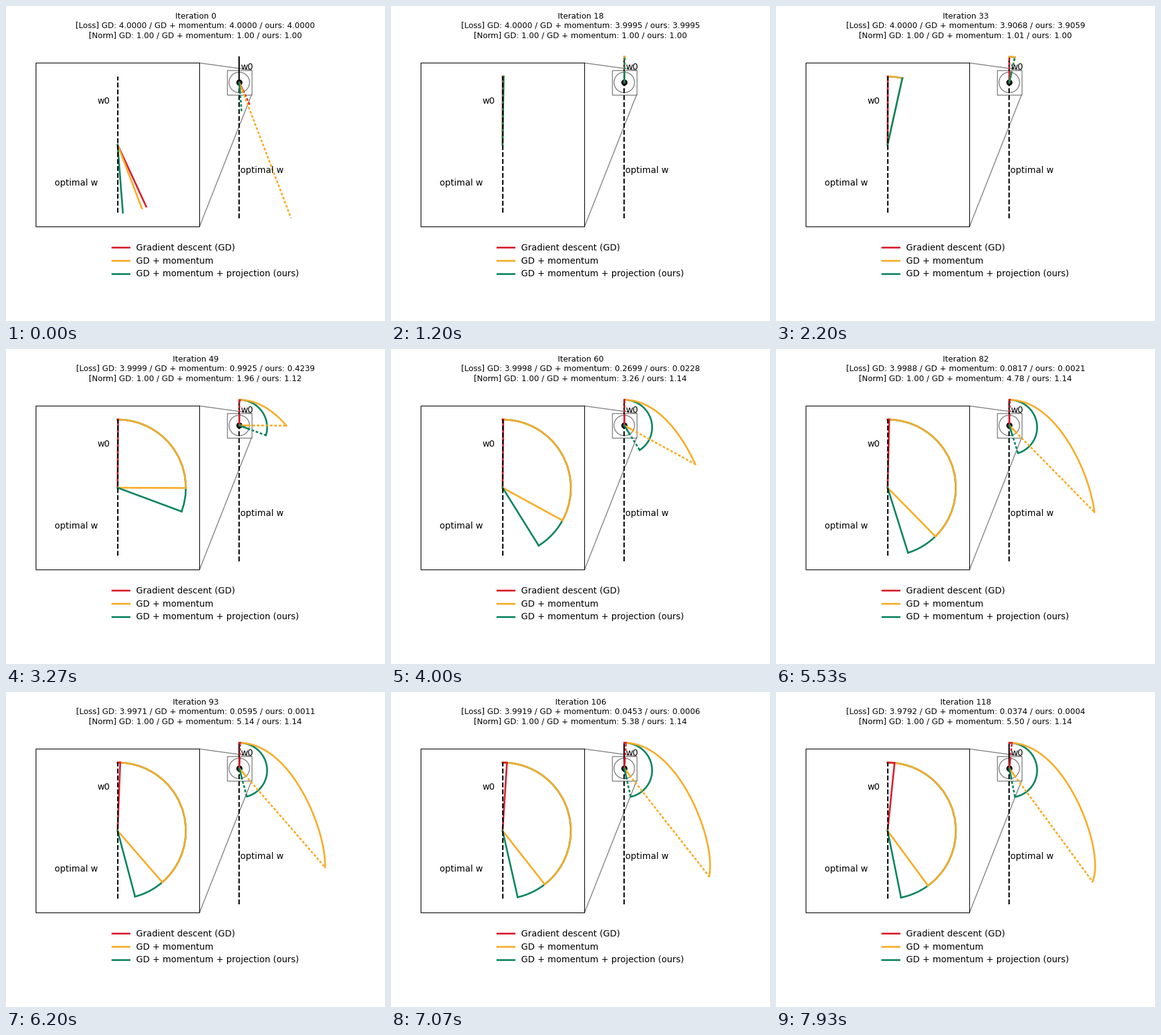
These frames come from a looping animation (600 by 500 pixels, 8000 ms). A matplotlib script:

```python
import numpy as np
import matplotlib.pyplot as plt
from matplotlib.animation import FuncAnimation
from matplotlib.patches import Circle, Rectangle

FRAMES, LOOP_MS, STEPS = 120, 8000, 500
LR, BETA = 0.01, 0.95
BG, GUIDE = "white", "#808080"
RED, YELLOW, GREEN = "#d81f2f", "#f8ad28", "#0b8561"
DOTS = (0, (1.5, 1))

# Places in pixels, y pointing down
MAIN, UNIT = np.array([369.3, 121.3]), 40.6
ZOOM, ZOOM_UNIT = np.array([176.65, 220.2]), 270.4
RING, HALF = 0.4, 0.48

plt.rcParams["font.family"] = "DejaVu Sans"


def loss(w):
    """Squared gap between the cosine with the optimum (0, -1) and one."""
    return (1 + w[1] / np.hypot(*w)) ** 2


def grad(w):
    r = np.hypot(*w)
    c = w[1] / r
    return 2 * (1 + c) * (np.array([0.0, 1.0]) - c * w / r) / r


def descend(beta=0.0, project=False):
    w, buf = np.array([0.001, 1.0]), np.zeros(2)
    path = [w]
    for _ in range(STEPS):
        buf = beta * buf + grad(w)
        step = buf - w * (w @ buf) / (w @ w) if project else buf
        w = w - LR * step
        path.append(w)
    return np.array(path)


def to_main(w):
    return MAIN + np.asarray(w) * [UNIT, -UNIT]


def to_zoom(w):
    return ZOOM + np.asarray(w) * [ZOOM_UNIT, -ZOOM_UNIT]


def on_ring(path):
    return RING * path / np.hypot(path[..., 0], path[..., 1])[..., None]


paths = [descend(), descend(BETA), descend(BETA, True)]
colors = [RED, YELLOW, GREEN]
labels = ["Gradient descent (GD)", "GD + momentum",
          "GD + momentum + projection (ours)"]

fig = plt.figure(figsize=(6, 5), dpi=100, facecolor=BG)
ax = fig.add_axes([0, 0, 1, 1])
ax.set(xlim=(0, 600), ylim=(500, 0))
ax.axis("off")


def line(points, color, lw, z, style="-"):
    x, y = np.transpose(points)
    return ax.plot(x, y, linestyle=style, color=color, lw=lw, zorder=z)[0]


def box(center, half, color, lw):
    ax.add_patch(Rectangle(center - half, 2 * half, 2 * half, fill=False,
                           ec=color, lw=lw, zorder=2))


# Fixed scenery
zoom_half, main_half = HALF * ZOOM_UNIT, HALF * UNIT
box(ZOOM, zoom_half, "black", 0.8)
box(MAIN, main_half, GUIDE, 1)
for side in (-1, 1):
    corner = np.array([1, side])
    line([ZOOM + zoom_half * corner, MAIN + main_half * corner], GUIDE, 1, 1)
ax.add_patch(Circle(MAIN, RING * UNIT, fill=False, ec=GUIDE, lw=1, zorder=2))
line([to_main((0, 1)), MAIN], "black", 1.5, 3)
line([(MAIN[0], 337), MAIN], "black", 1.5, 3, "--")
line([to_zoom((0, -RING)), to_zoom((0, RING))], "black", 1.5, 9, "--")
ax.plot(*MAIN, "o", color="black", ms=6, zorder=4)

for x, y, label in [(144.5, 154.9, "w0"), (77, 285, "optimal w"),
                    (371.5, 100.9, "w0"), (371, 265, "optimal w")]:
    ax.text(x, y, label, fontsize=10, zorder=10)
for i, (color, label) in enumerate(zip(colors, labels)):
    y = 383 + 20.8 * i
    line([(167.5, y), (195.3, y)], color, 2, 3)
    ax.text(206, y + 4.8, label, fontsize=10)
title = ax.text(300, 10, "", fontsize=9, ha="center", va="top")

# Moving parts: trails and current vectors, in both views
empty = np.empty((0, 2))
trails, vectors = [], []
for i, color in enumerate(colors):
    trails.append([line(empty, color, 2, 5 - 0.1 * i) for _ in range(2)])
    vectors.append([line(empty, color, 2, 6 + 0.1 * i, DOTS),
                    line(empty, color, 2, 7 + 0.1 * i),
                    line(empty, color, 2, 7 + 0.1 * i)])


def put(artist, points):
    artist.set_data(*np.transpose(points))


def caption(k):
    a, b, c = (loss(p[k]) for p in paths)
    p, q, r = (np.hypot(*path[k + 1]) for path in paths)
    return (f"Iteration {k}\n"
            f"[Loss] GD: {a:.4f} / GD + momentum: {b:.4f} / ours: {c:.4f}\n"
            f"[Norm] GD: {p:.2f} / GD + momentum: {q:.2f} / ours: {r:.2f}")


def update(k):
    title.set_text(caption(k))
    # The opening frame shows the final vectors without any trail
    now = k if k else STEPS
    for path, (trail, arc), (dots, stub, hand) in zip(paths, trails, vectors):
        past = path[:k + 1] if k else empty
        put(trail, to_main(past))
        put(arc, to_zoom(on_ring(past)))
        tip = on_ring(path[now])
        put(dots, [MAIN, to_main(path[now])])
        put(stub, [MAIN, to_main(tip)])
        put(hand, [ZOOM, to_zoom(tip)])
    return []


anim = FuncAnimation(fig, update, frames=FRAMES, interval=LOOP_MS / FRAMES,
                     init_func=lambda: update(0), repeat=True, repeat_delay=0)
plt.show()
```
